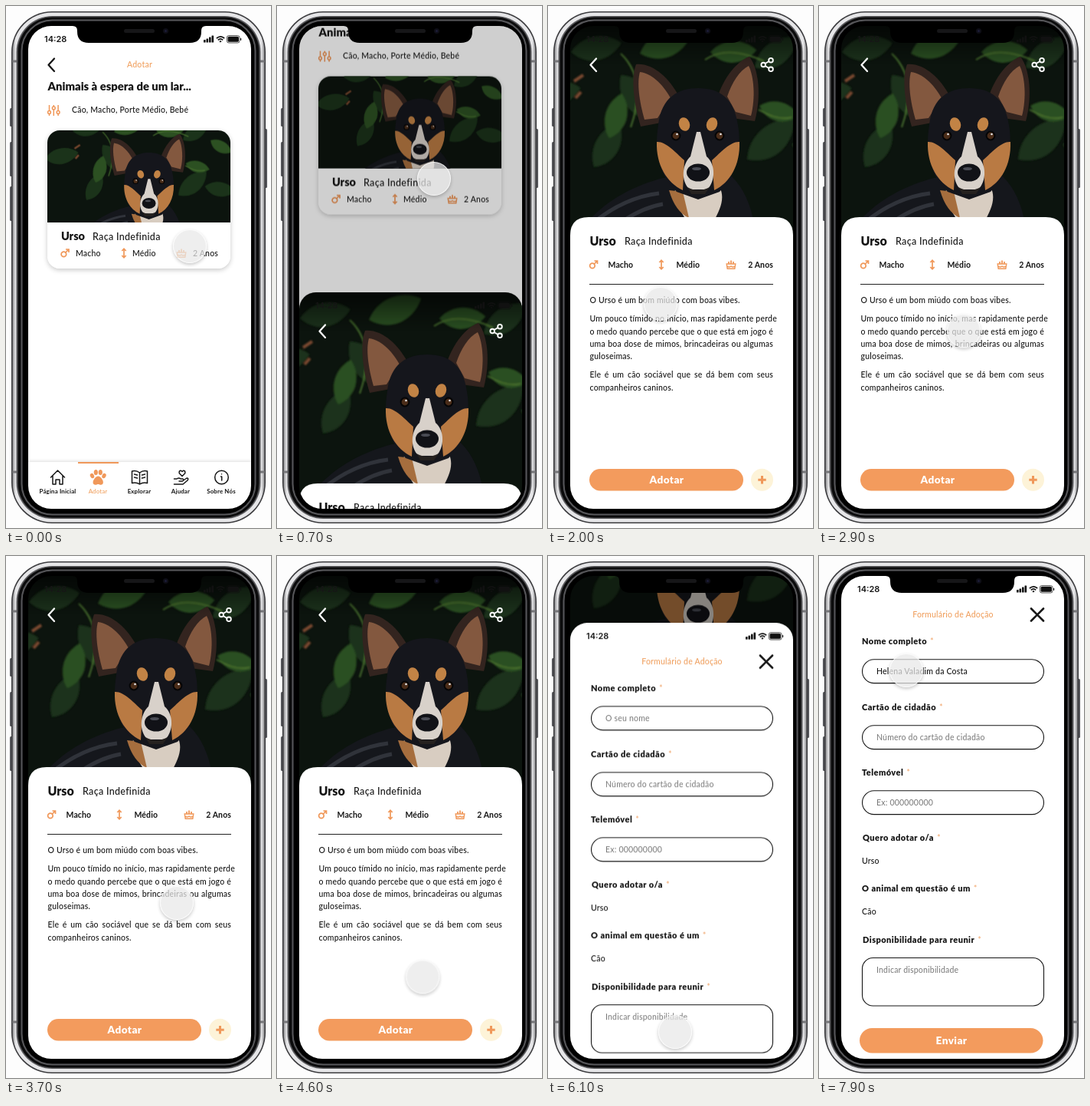
Animation, 346 px wide and 680 px high, one loop 8000 ms. Source, as an HTML page:

```html
<!DOCTYPE html>
<html lang="pt">
<head>
<meta charset="utf-8">
<title>Adotar</title>
<style>
html, body { margin: 0; width: 346px; height: 680px; overflow: hidden; background: #fdfdfd; }
svg { position: absolute; left: 0; top: 0; display: block; }
.view { position: absolute; left: 29px; top: 26px; width: 291px; height: 629px; overflow: hidden; border-radius: 30px; background: #000; }
.page { position: absolute; inset: 0; overflow: hidden; background: #fff; }
.detail, .form { border-radius: 22px 22px 0 0; }
.dim { position: absolute; inset: 0; background: #000; opacity: 0; }

/* type */
text, .bio { font: 500 10.5px Lato, "Open Sans", sans-serif; letter-spacing: .2px; fill: #161616; color: #161616; }
.head { font-weight: 900; font-size: 14.8px; letter-spacing: 0; }
.name { font-weight: 900; font-size: 16px; letter-spacing: 0; }
.breed { font-size: 12.5px; letter-spacing: .3px; }
.strong { font-weight: 700; letter-spacing: .1px; }
.label text { font-weight: 900; font-size: 11px; letter-spacing: .45px; }
.star { font-weight: 400; fill: #f0a469; }
.hint text { font-weight: 400; fill: #777; }
.tabs text { font-weight: 700; font-size: 7.9px; letter-spacing: .15px; }
.mid, .tabs text { text-anchor: middle; }
text.orange, .tabs text.orange { fill: #f0a05f; font-weight: 500; }
.cta { font-weight: 900; font-size: 13.6px; letter-spacing: .4px; fill: #fff; text-anchor: middle; }
.clock { font: 600 11px Inter, "Liberation Sans", sans-serif; letter-spacing: 0; }
.bio { position: absolute; left: 25.5px; top: 349px; width: 239.5px; line-height: 16.3px; }
.bio p { margin: 0 0 8px; }
.bio span { display: block; white-space: nowrap; text-align-last: justify; }
.bio span:last-child { text-align-last: left; }

.line { fill: none; stroke: #161616; stroke-width: 1.5; stroke-linecap: round; stroke-linejoin: round; }
.field { fill: none; stroke: #161616; stroke-width: 1.1; }
.card { position: absolute; left: 25px; top: 136px; width: 239px; height: 180px; border-radius: 16px; box-shadow: 0 2px 6px rgba(0,0,0,.22); }
.bar { position: absolute; left: 0; top: 568px; width: 291px; height: 61px; background: #fff; box-shadow: 0 -1px 4px rgba(0,0,0,.14); }
.cursor { position: absolute; left: -22px; top: -22px; width: 44px; height: 44px; box-sizing: border-box; border-radius: 50%;
  background: rgba(232,232,232,.74); border: 1.3px solid rgba(255,255,255,.75); box-shadow: 0 2px 4px rgba(0,0,0,.22); }

/* motion */
.list, .detail, .form, .dim, .cursor, .typed, .empty { animation: 8s linear infinite; }
.list { animation-name: leave1; }
.list .dim { animation-name: dim1; }
.detail { animation-name: pass; }
.detail .dim { animation-name: dim2; }
.form { animation-name: enter2; }
.cursor { animation-name: point; }
.typed { animation-name: show; }
.empty { animation-name: hide; }
@keyframes leave1 {
  0%, 7.25% { transform: none; animation-timing-function: ease-out; }
  12.25%, 100% { transform: translateY(-157px); }
}
@keyframes dim1 {
  0%, 7.25% { opacity: 0; animation-timing-function: ease-out; }
  12.25%, 100% { opacity: .42; }
}
@keyframes pass {
  0%, 7.25% { transform: translateY(629px); animation-timing-function: ease-out; }
  12.25%, 72.54% { transform: none; animation-timing-function: ease-out; }
  77.54%, 100% { transform: translateY(-157px); }
}
@keyframes dim2 {
  0%, 72.54% { opacity: 0; animation-timing-function: ease-out; }
  77.54%, 100% { opacity: .42; }
}
@keyframes enter2 {
  0%, 72.54% { transform: translateY(629px); animation-timing-function: ease-out; }
  77.54%, 100% { transform: none; }
}
@keyframes point {
  0% { transform: translate(240px, 313px); animation-timing-function: ease-in-out; }
  6.5%, 12.5% { transform: translate(205px, 225px); animation-timing-function: ease-in-out; }
  25% { transform: translate(147px, 388px); animation-timing-function: ease-in-out; }
  46.25% { transform: translate(223px, 452px); animation-timing-function: ease-in-out; }
  67%, 79.5% { transform: translate(166px, 620px); animation-timing-function: ease-in-out; }
  87.5% { transform: translate(128px, 57px); animation-timing-function: ease-in-out; }
  93% { transform: translate(104px, 149px); }
  98.75%, 100% { transform: translate(114px, 149px); }
}
@keyframes show { 0%, 93.7% { opacity: 0; } 93.71%, 100% { opacity: 1; } }
@keyframes hide { 0%, 93.7% { opacity: 1; } 93.71%, 100% { opacity: 0; } }
</style>
</head>
<body>
<svg width="0" height="0">
  <defs>
    <linearGradient id="shade" x2="0" y2="1">
      <stop offset="0" stop-color="#000" stop-opacity=".6"/>
      <stop offset="1" stop-color="#000" stop-opacity="0"/>
    </linearGradient>
    <linearGradient id="metal">
      <stop offset="0" stop-color="#8d8d8f"/><stop offset=".012" stop-color="#e6e6e8"/>
      <stop offset=".988" stop-color="#e6e6e8"/><stop offset="1" stop-color="#8d8d8f"/>
    </linearGradient>
    <filter id="soft"><feGaussianBlur stdDeviation="1.2"/></filter>
    <clipPath id="round"><rect x="54" y="162" width="239" height="180" rx="16"/></clipPath>
    <clipPath id="crop"><rect x="54" y="162" width="239" height="120"/></clipPath>
    <path id="leaf" d="M0 0C14-22 44-28 66-12C52 12 22 20 0 0Z"/>

    <g id="status">
      <text class="clock" x="50" y="47">14:28</text>
      <g fill="#111">
        <rect x="258" y="44" width="2.6" height="3.6" rx=".6"/><rect x="261.5" y="42.5" width="2.6" height="5.1" rx=".6"/>
        <rect x="265" y="40.5" width="2.6" height="7.1" rx=".6"/><rect x="268.5" y="38.5" width="2.6" height="9.1" rx=".6"/>
        <rect x="289.5" y="39.8" width="14.4" height="7" rx="1.6"/><rect x="306" y="41.8" width="1.2" height="3" rx=".6"/>
      </g>
      <g fill="none" stroke="#111">
        <rect x="288.3" y="38.6" width="16.8" height="9.4" rx="2.6" stroke-width=".7"/>
        <path d="M274.8 42.2Q280 37.4 285.2 42.2M276.8 44.4Q280 41.5 283.2 44.4" stroke-width="1.7"/>
        <path d="M278.8 46Q280 45 281.2 46L280 47.2Z" fill="#111" stroke-width=".8"/>
      </g>
    </g>

    <g id="male" fill="none" stroke="#f0985a" stroke-width="1.7">
      <circle cx="-1.6" cy="1.4" r="3.3"/><path d="M.8-1L4.6-4.6M1-5H5V-1"/>
    </g>
    <path id="size" d="M0-5.5V5.5M-2.7-3L0-5.8L2.7-3M-2.7 3L0 5.8L2.7 3" fill="none" stroke="#f0985a" stroke-width="1.7"/>
    <g id="cake" fill="none" stroke="#f0985a" stroke-width="1.4">
      <path d="M-5.8-1H5.8L4.8 5.3H-4.8ZM-5 2Q-2.5 4 0 2Q2.5 4 5 2"/><path d="M-3-1V-4M0-1V-5.6M3-1V-4" stroke-width="1.8"/>
    </g>
    <path id="back" d="M63 68.5L55.5 76.8L63 85" fill="none" stroke-width="2.3" stroke-linecap="round" stroke-linejoin="round"/>

    <g id="photo">
      <rect x="-40" y="20" width="430" height="300" fill="#0c140e"/>
      <g filter="url(#soft)">
        <g fill="#1b331a">
          <use href="#leaf" transform="translate(30 60)"/><use href="#leaf" transform="translate(95 90) rotate(60) scale(1.2)"/>
          <use href="#leaf" transform="translate(270 80) rotate(-25)"/><use href="#leaf" transform="translate(260 200) rotate(-30) scale(1.2)"/>
          <use href="#leaf" transform="translate(60 210) rotate(-50)"/><use href="#leaf" transform="translate(-30 120) scale(1.1)"/>
          <use href="#leaf" transform="translate(318 180) rotate(20)"/>
        </g>
        <g fill="#2c5022">
          <use href="#leaf" transform="translate(120 62) rotate(-12) scale(1.1)"/><use href="#leaf" transform="translate(212 60) rotate(8) scale(.9)"/>
          <use href="#leaf" transform="translate(80 172) rotate(-64) scale(.9)"/><use href="#leaf" transform="translate(276 130) rotate(25) scale(.8)"/>
          <use href="#leaf" transform="translate(330 80) rotate(40) scale(.8)"/>
        </g>
        <path d="M95 62Q130 95 108 158M205 70Q235 50 282 72M275 135Q300 150 318 145" fill="none" stroke="#48702f" stroke-width="2"/>
        <path d="M34 98L46 90M36 120L43 112" stroke="#7b4a30" stroke-width="4"/>
      </g>
      <path d="M30 310C62 258 106 236 150 224L240 222C262 244 270 276 272 310Z" fill="#15171c"/>
      <path d="M50 290Q95 250 145 244M78 295Q115 264 150 258" fill="none" stroke="#30333a" stroke-width="5"/>
      <path d="M166 238L224 236C233 252 222 272 209 292L188 292C176 270 164 258 166 238Z" fill="#d8cdc1"/>
      <path d="M158 240L176 242L184 276Q166 268 158 240Z" fill="#a66e3e"/>
      <path d="M121 157C112 128 108 94 115 76C137 74 158 94 170 116L148 152Z" fill="#33241f"/>
      <path d="M126 148C119 124 116 100 120 86C138 88 152 106 160 120L143 146Z" fill="#83583f"/>
      <path d="M223 114C230 94 246 72 263 66C275 82 279 116 270 150L240 146Z" fill="#33241f"/>
      <path d="M234 118C240 100 250 84 262 78C269 92 271 120 265 143L245 138Z" fill="#83583f"/>
      <path d="M144 155C148 118 171 107 196 107C224 107 243 120 248 155C254 190 244 222 224 242L196 252L168 242C146 222 138 190 144 155Z" fill="#15161c"/>
      <path d="M142 177C153 176 166 190 178 201L176 240C155 230 141 207 142 177Z" fill="#b97a43"/>
      <path d="M250 177C239 176 226 190 214 201L217 240C238 230 251 207 250 177Z" fill="#b97a43"/>
      <ellipse cx="178" cy="154" rx="7" ry="9" transform="rotate(-20 178 154)" fill="#c28345"/>
      <ellipse cx="214" cy="154" rx="7" ry="9" transform="rotate(20 214 154)" fill="#c28345"/>
      <path d="M194 164L199 164L207 196C219 206 219 228 208 239L185 239C173 228 175 206 186 196Z" fill="#d8d1ca"/>
      <ellipse cx="196" cy="217" rx="15" ry="11.5" fill="#111217"/>
      <path d="M182 236Q196 244 211 236L205 245H187Z" fill="#25211f"/>
      <ellipse cx="194" cy="212" rx="6" ry="2" fill="#4a4c55"/>
      <g fill="#4b2d19" stroke="#050506" stroke-width="2"><circle cx="167" cy="169" r="5.4"/><circle cx="224" cy="169" r="5.4"/></g>
      <g fill="#e6e8ec"><circle cx="168.5" cy="167" r="1.3"/><circle cx="225.5" cy="167" r="1.3"/></g>
    </g>
  </defs>
</svg>

<!-- phone body -->
<svg width="346" height="680">
  <g fill="#55565a">
    <rect x="5" y="133" width="4" height="24" rx="1.5"/><rect x="5" y="177" width="4" height="45" rx="1.5"/>
    <rect x="5" y="235" width="4" height="45" rx="1.5"/><rect x="336" y="160" width="5" height="77" rx="1.5"/>
  </g>
  <rect x="7" y="7" width="332" height="667" rx="53" fill="#3b3b3e"/>
  <rect x="8.6" y="8.6" width="328.8" height="663.8" rx="51.4" fill="url(#metal)"/>
  <path d="M8 72h6M332 72h6M8 607h6M332 607h6" stroke="#77777a" stroke-width="3"/>
  <rect x="13.5" y="13" width="319" height="655" rx="47" fill="#58585b"/>
  <rect x="15.5" y="14.5" width="315" height="652" rx="45" fill="#0b0b0c"/>
  <rect x="20.5" y="18.5" width="305" height="644" rx="40" fill="none" stroke="#57575a" stroke-width="2"/>
  <rect x="22" y="20" width="302" height="641" rx="38" fill="#000"/>
</svg>

<div class="view">
  <div class="page list">
    <div class="card"></div>
    <div class="bar"></div>
    <svg width="291" height="629" viewBox="29 26 291 629">
      <use href="#status"/>
      <use href="#back" stroke="#161616"/>
      <text class="orange mid" x="174.5" y="80">Adotar</text>
      <text class="head" x="54.5" y="110">Animais à espera de um lar...</text>
      <g fill="#fff" stroke="#f0985a" stroke-width="1.5">
        <path d="M56.5 129V143M62.3 129V143M68.1 129V143"/>
        <circle cx="56.5" cy="138.5" r="1.9"/><circle cx="62.3" cy="133" r="1.9"/><circle cx="68.1" cy="138.5" r="1.9"/>
      </g>
      <text x="86" y="139">Cão, Macho, Porte Médio, Bebé</text>
      <g clip-path="url(#round)">
        <rect x="54" y="162" width="239" height="180" fill="#fff"/>
        <g clip-path="url(#crop)"><use href="#photo" transform="translate(69 126.8) scale(.6)"/></g>
      </g>
      <text class="name" x="72" y="305" style="font-size:14.5px">Urso</text>
      <text class="breed" x="113" y="305">Raça Indefinida</text>
      <use href="#male" x="77" y="322"/><text x="91" y="326">Macho</text>
      <use href="#size" x="154" y="322"/><text x="165" y="326">Médio</text>
      <use href="#cake" x="229" y="322"/><text x="244" y="326">2 Anos</text>
      <rect x="94" y="594" width="53" height="2" fill="#f0985a"/>
      <g class="line">
        <path d="M58.5 614L67.5 605L76.5 614M61 612V623H65V617H70V623H74V612"/>
        <path d="M174.5 608Q170 604.500 164.500 606V621.500Q170 620 174.500 623Q179 620 184.500 621.500V606Q179 604.500 174.500 608V623M167.500 610L171.500 611M167.500 614L171.500 615M177.500 611L181.500 610M177.500 615L181.500 614"/>
        <path d="M219.5 616H223Q226 614 228 616H231Q233 618 230 619H226M231.500 618L236 615Q239 615 237 618L231 623H219.500M230 612.500L226.300 608.800Q225.500 605 228.500 605.200L230 606.500L231.500 605.200Q234.500 605 233.700 608.800Z"/>
        <circle cx="281.500" cy="614" r="8.800"/><path d="M280.500 613H281.700V618M281.500 609.700V609.800"/>
      </g>
      <g fill="#f0985a">
        <ellipse cx="112.500" cy="612" rx="2.500" ry="3.400" transform="rotate(-25 112.500 612)"/><ellipse cx="117.300" cy="607.500" rx="2.600" ry="3.600"/>
        <ellipse cx="123.300" cy="607.500" rx="2.600" ry="3.600"/><ellipse cx="128" cy="612" rx="2.500" ry="3.400" transform="rotate(25 128 612)"/>
        <path d="M120.300 612.500C124 612.500 129 620 126 623C124 624.800 122 623 120.300 623S116.500 624.800 114.500 623C111.500 620 116.500 612.500 120.300 612.500Z"/>
      </g>
      <g class="tabs">
        <text x="67.500" y="635">Página Inicial</text><text class="orange" x="120" y="635">Adotar</text>
        <text x="174" y="635">Explorar</text><text x="228" y="635">Ajudar</text><text x="281" y="635">Sobre Nós</text>
      </g>
    </svg>
    <div class="dim"></div>
  </div>

  <div class="page detail">
    <svg width="291" height="629" viewBox="29 26 291 629">
      <use href="#photo"/>
      <rect x="29" y="26" width="291" height="50" fill="url(#shade)"/>
      <use href="#status"/>
      <use href="#back" stroke="#fff"/>
      <g fill="none" stroke="#fff" stroke-width="1.900">
        <path d="M283.500 75L288.500 72M283.500 78L288.500 81"/>
        <circle cx="281.200" cy="76.500" r="2.800"/><circle cx="291" cy="70.700" r="2.800"/><circle cx="291" cy="82.300" r="2.800"/>
      </g>
      <path d="M29 655V299Q29 275 53 275H296Q320 275 320 299V655Z" fill="#fff"/>
      <text class="name" x="54.500" y="311.500">Urso</text>
      <text class="breed" x="100" y="311">Raça Indefinida</text>
      <use href="#male" x="59.500" y="337"/><text class="strong" x="78.500" y="340.500">Macho</text>
      <use href="#size" x="148" y="337"/><text class="strong" x="167.500" y="340.500">Médio</text>
      <use href="#cake" x="239" y="337"/><text class="strong" x="294" y="340.500" text-anchor="end">2 Anos</text>
      <path d="M54 362.500H294" stroke="#222"/>
      <rect x="54" y="603" width="201" height="28.500" rx="14.250" fill="#f39b5d"/>
      <text class="cta" x="155" y="622">Adotar</text>
      <circle cx="279.500" cy="617.300" r="14.500" fill="#fdf3d8"/>
      <path d="M274.300 617.300H284.700M279.500 612.100V622.500" stroke="#f0985a" stroke-width="3"/>
    </svg>
    <div class="bio">
      <p><span>O Urso é um bom miúdo com boas vibes.</span></p>
      <p><span>Um pouco tímido no início, mas rapidamente perde</span>
        <span>o medo quando percebe que o que está em jogo é</span>
        <span>uma boa dose de mimos, brincadeiras ou algumas</span>
        <span>guloseimas.</span></p>
      <p><span>Ele é um cão sociável que se dá bem com seus</span>
        <span>companheiros caninos.</span></p>
    </div>
    <div class="dim"></div>
  </div>

  <div class="page form">
    <svg width="291" height="629" viewBox="29 26 291 629">
      <use href="#status"/>
      <text class="orange mid" x="175" y="80">Formulário de Adoção</text>
      <path d="M277 68.500L293 84.500M293 68.500L277 84.500" stroke="#161616" stroke-width="2.600" stroke-linecap="round"/>
      <g class="label">
        <text x="56" y="115">Nome completo<tspan class="star" dx="4">*</tspan></text>
        <text x="56" y="201">Cartão de cidadão<tspan class="star" dx="4">*</tspan></text>
        <text x="56" y="286">Telemóvel<tspan class="star" dx="4">*</tspan></text>
        <text x="57" y="371">Quero adotar o/a<tspan class="star" dx="4">*</tspan></text>
        <text x="56" y="437">O animal em questão é um<tspan class="star" dx="4">*</tspan></text>
        <text x="57" y="504">Disponibilidade para reunir<tspan class="star" dx="4">*</tspan></text>
      </g>
      <g class="field">
        <rect x="56.500" y="134.800" width="237" height="30.800" rx="15.400"/><rect x="56.500" y="220.800" width="237" height="30.800" rx="15.400"/>
        <rect x="56.500" y="305.800" width="237" height="30.800" rx="15.400"/><rect x="56.500" y="523.500" width="237" height="62.500" rx="14"/>
      </g>
      <g class="hint">
        <text class="empty" x="75" y="153.800">O seu nome</text>
        <text x="75" y="240">Número do cartão de cidadão</text>
        <text x="75" y="325">Ex: 000000000</text>
        <text x="75" y="543">Indicar disponibilidade</text>
      </g>
      <text class="typed" x="75" y="153.800">Helena Valadim da Costa</text>
      <text x="56" y="401">Urso</text>
      <text x="56" y="467">Cão</text>
      <rect x="53" y="615" width="239.500" height="32.500" rx="16.250" fill="#f39b5d"/>
      <text class="cta" x="173" y="635.500">Enviar</text>
    </svg>
  </div>
</div>

<!-- notch -->
<svg width="346" height="680">
  <path d="M87 25V26Q93 26 93 32V33Q93 48 108 48H240Q255 48 255 33V32Q255 26 261 26V25Z" fill="#000"/>
  <rect x="154" y="30" width="40" height="5" rx="2.500" fill="#161618"/>
  <circle cx="208.500" cy="32.500" r="3.600" fill="#0e0e16"/><circle cx="208.500" cy="32.500" r="1.500" fill="#1c1c38"/>
</svg>
<div class="cursor"></div>
</body>
</html>
```
